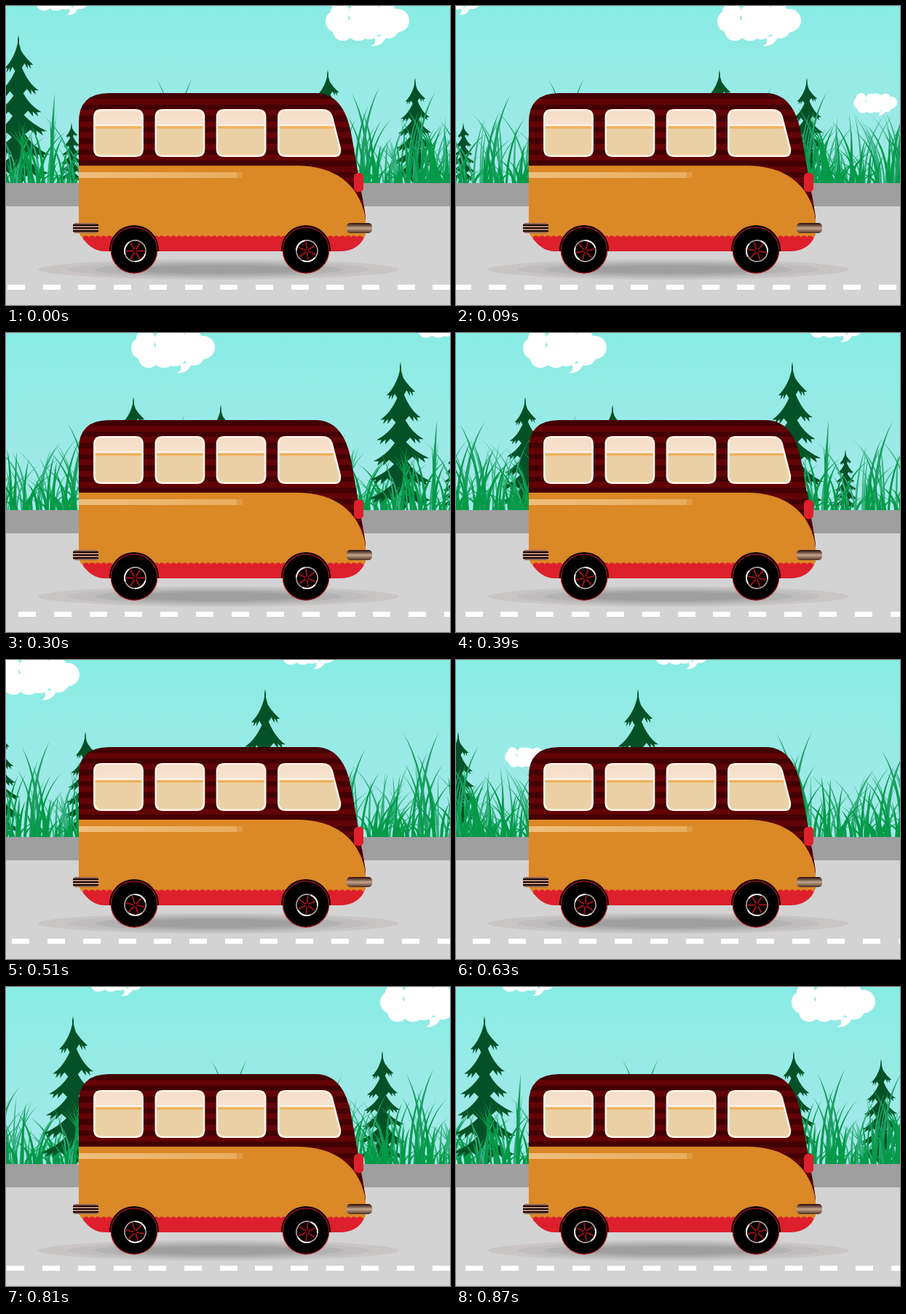
Write an HTML page with a canvas that moves like this. It is 610x412 px and loops after 0.9 s.

```html
<!DOCTYPE html>
<html lang="en">
<head>
<meta charset="utf-8">
<title>Bus ride</title>
<style>
html, body { margin: 0; width: 100%; height: 100%; overflow: hidden; background: #d3d3d3; }
canvas { display: block; }
</style>
</head>
<body>
<canvas id="stage" width="610" height="412"></canvas>
<script>
const W = 610, H = 412, SPAN = 792, GROUND = 244;
const STEP = 30, STEPS = 30, DASH_GAP = 48.7;
const ctx = document.getElementById('stage').getContext('2d');

// Distance travelled by step number.
const SCENE = [[0, 0], [15, 400], [29, 770], [30, 792]];
const DASHES = [[0, 0], [6, 108], [13, 233], [17, 334.5], [21, 417], [25, 499.5], [29, 573], [30, 585]];

function along(table, k) {
  const i = table.findIndex(p => p[0] > k);
  const [k0, v0] = table[i - 1], [k1, v1] = table[i];
  return v0 + (v1 - v0) * (k - k0) / (k1 - k0);
}

function randomizer(seed) {
  return () => (seed = (seed * 16807) % 2147483647) / 2147483647;
}

function layer(w, paint) {
  const c = document.createElement('canvas');
  c.width = w;
  c.height = H;
  paint(c.getContext('2d'));
  return c;
}

function gradient(g, x0, y0, x1, y1, ...colors) {
  const grad = g.createLinearGradient(x0, y0, x1, y1);
  colors.forEach((c, i) => grad.addColorStop(i / (colors.length - 1), c));
  return grad;
}

function shape(g, d, fill, stroke, width) {
  const p = new Path2D(d);
  if (fill) { g.fillStyle = fill; g.fill(p); }
  if (stroke) { g.strokeStyle = stroke; g.lineWidth = width; g.stroke(p); }
}

function disc(g, x, y, rx, ry, fill, stroke, width) {
  g.beginPath();
  g.ellipse(x, y, rx, ry, 0, 0, Math.PI * 2);
  if (fill) { g.fillStyle = fill; g.fill(); }
  if (stroke) { g.strokeStyle = stroke; g.lineWidth = width; g.stroke(); }
}

function pill(g, x, y, w, h, r, fill) {
  g.beginPath();
  g.roundRect(x, y, w, h, r);
  g.fillStyle = fill;
  g.fill();
}

const PUFFS = [[16, 21, 16], [20, 8, 13], [24, 34, 14], [45, 31, 17], [60, 30, 16], [58, 20, 24],
  [46, 10, 14], [86, 30, 15], [99, 20, 16], [84, 9, 13]];

function cloud(g, x, bottom, s) {
  g.save();
  g.translate(x, bottom - 56 * s);
  g.scale(s, s);
  for (const [cx, cy, r] of PUFFS) disc(g, cx, cy, r, r, '#fff');
  shape(g, 'M67 43 Q71 52 62 55 Q79 57 84 40 Z', '#fff');
  g.restore();
}

const TIERS = [[43, 20], [78, 27], [105, 33], [135, 38], [165, 41], [190, 42]];

function tree(g, x, top) {
  const s = (GROUND - top) / 204, rnd = randomizer(91);
  g.save();
  g.translate(x, top);
  g.scale(s, s);
  g.fillStyle = '#045127';
  for (const side of [-1, 1]) {
    g.beginPath();
    g.moveTo(-side, 0);
    g.quadraticCurveTo(side, 14, side * 4, 22);
    for (const [ty, tw] of TIERS) {
      const w = tw * (0.95 + rnd() * 0.1), y = ty + rnd() * 6 - 3;
      g.quadraticCurveTo(side * w * 0.5, y - 9, side * w, y);
      g.lineTo(side * w * 0.8, y);
      g.lineTo(side * w * 0.86, y + 6);
      g.lineTo(side * w * 0.62, y - 1);
      g.lineTo(side * w * 0.64, y + 6);
      g.lineTo(side * w * 0.42, y - 2);
      g.lineTo(side * w * 0.24, y + 4);
    }
    g.lineTo(side * 5, 204);
    g.lineTo(-side, 204);
    g.fill();
  }
  g.restore();
}

function blade(g, x, h, lean, w, color) {
  const tx = x + lean, ty = GROUND - h, my = GROUND - h * 0.66, mx = x + lean * 0.1;
  g.beginPath();
  g.moveTo(x - w, GROUND);
  g.quadraticCurveTo(mx - w, my, tx, ty);
  g.quadraticCurveTo(mx + w, my, x + w, GROUND);
  g.fillStyle = color;
  g.fill();
}

// Tip position, height and lean of the tallest blades.
const TALL = [[67, 124, 4], [155, 122, 26], [207, 143, -32], [256, 145, 28], [352, 119, -28],
  [387, 122, 30], [475, 124, -24], [513, 132, 26], [550, 104, -30], [590, 126, 28],
  [705, 112, 20], [735, 106, 32]];

function grass(g) {
  const rnd = randomizer(4217);
  for (let i = 0; i < 190; i++) {
    blade(g, rnd() * SPAN, 35 + rnd() * 65, (rnd() - 0.5) * 90, 0.9 + rnd() * 0.7, '#2fae78');
  }
  for (const [x, h, lean] of TALL) {
    blade(g, x - lean, h, lean, 2.2, '#1d9f62');
    blade(g, x - lean * 1.3, h * 0.8, lean * 0.7, 1.8, '#0f9a54');
    blade(g, x - lean * 0.8, h * 0.7, -lean * 0.9, 1.6, '#0f9a54');
  }
  for (let i = 0; i < 290; i++) {
    const r = rnd();
    blade(g, rnd() * SPAN, 16 + r * r * 74, (rnd() - 0.5) * 76, 1.2 + rnd() * 0.9, '#049a48');
  }
}

const scenery = layer(SPAN, g => {
  for (const shift of [-SPAN, 0, SPAN]) {
    g.save();
    g.translate(shift, 0);
    cloud(g, 439, 56, 1);
    cloud(g, 626, 152, 0.525);
    cloud(g, 33, 13, 0.8);
    tree(g, 17, 40);
    tree(g, 442, 88);
    tree(g, 562, 99);
    tree(g, 90, 161);
    grass(g);
    g.restore();
  }
});

const backdrop = layer(W, g => {
  g.fillStyle = gradient(g, 0, 0, 0, GROUND, '#88ece4', '#98eae6', '#a5e8ec');
  g.fillRect(0, 0, W, GROUND);
});

function windowPane(g, d) {
  const p = new Path2D(d);
  g.save();
  g.clip(p);
  g.fillStyle = '#ebd0a6';
  g.fillRect(115, 140, 350, 70);
  g.fillStyle = gradient(g, 0, 142, 0, 164, '#f5dcc6', '#f7e2d0');
  g.fillRect(115, 140, 350, 24);
  g.fillStyle = '#fdf3e6';
  g.fillRect(115, 163, 350, 2);
  g.fillStyle = '#f0b25c';
  g.fillRect(115, 166, 350, 3);
  g.restore();
  shape(g, d, null, '#fff4ea', 2.6);
}

function wheelBase(g, x) {
  shape(g, `M${x - 34} 338 V336 A34 34 0 0 1 ${x + 34} 336 V338 Z`, '#000');
  disc(g, x, 336.5, 31.7, 31.7, '#000', '#b3141e', 1.2);
}

const bus = layer(W, g => {
  const rings = [[248, 14, '#cac5c5'], [207, 12, '#bfbdbd'], [170, 10, '#b4b3b3'],
    [140, 8, '#a9a9a9'], [118, 6, '#9f9f9f']];
  for (const [rx, ry, c] of rings) disc(g, 292, 363, rx, ry, c);

  g.save();
  g.clip(new Path2D('M100 160 Q100 120 142 120 H425 C458 120 470 150 475 180 L484 232 C487 252 491 268 494 290 V300 H100 Z'));
  for (let i = 0; i < 24; i++) {
    g.fillStyle = i % 2 ? '#610307' : '#430003';
    g.fillRect(100, Math.round(120 + i * 7.75), 400, 8);
  }
  g.restore();

  shape(g, 'M102 314 H494 Q486 338 458 338 H136 Q115 338 102 314 Z', '#de1f2c');
  shape(g, 'M100 220 H400 C452 220 484 246 493 288 L495 304 Q495 313 492 319 H104 L100 312 Z', '#db8826');
  for (let x = 110; x < 490; x += 8) disc(g, x, 320, 4, 3.4, '#de1f2c');

  g.fillStyle = gradient(g, 100, 0, 317, 0, '#efbd7c', '#ecb66e', '#e8ad5f');
  g.fillRect(100, 229, 217, 8);
  g.fillStyle = '#e19a42';
  g.fillRect(317, 229, 8, 8);

  for (const x of [121.4, 205.8, 290]) {
    windowPane(g, `M${x + 10} 143.3 h46.2 q10 0 10 10 v43.4 q0 10 -10 10 h-46.2 q-10 0 -10 -10 v-43.4 q0 -10 10 -10 Z`);
  }
  windowPane(g, 'M384.4 143.3 H434 Q445 143.3 447.6 152 L458.8 196 Q460 206.7 452 206.7 H384.4 Q374.4 206.7 374.4 196.7 V153.3 Q374.4 143.3 384.4 143.3 Z');

  pill(g, 478, 230, 13, 26, 5, '#de1f2c');
  wheelBase(g, 176);
  wheelBase(g, 412);

  pill(g, 92, 299, 35, 14, 4, gradient(g, 0, 299, 0, 313, '#8a5f52', '#c99a86', '#8a5f52'));
  g.fillStyle = '#160504';
  for (const y of [301, 305, 309]) g.fillRect(92, y, 35, 2);
  pill(g, 468, 299, 35, 14, 5, gradient(g, 0, 299, 0, 313, '#2a0d0a', '#6f5244', '#c5a78d', '#8e6d59', '#4a2c22'));
});

function hub(x, angle) {
  ctx.save();
  ctx.translate(x, 337.5);
  ctx.rotate(angle);
  disc(ctx, 0, 0, 14.6, 14.6, '#080000', '#b5aaa6', 1.6);
  ctx.strokeStyle = '#f4f1ee';
  ctx.lineWidth = 2;
  for (const a of [0.3, 2.8]) {
    ctx.beginPath();
    ctx.arc(0, 0, 14.6, a, a + 1.3);
    ctx.stroke();
  }
  ctx.strokeStyle = '#a5121b';
  ctx.lineWidth = 1.8;
  ctx.beginPath();
  for (let i = 0; i < 6; i++) {
    const a = i * Math.PI / 3;
    ctx.moveTo(Math.cos(a) * 2, Math.sin(a) * 2);
    ctx.lineTo(Math.cos(a) * 13, Math.sin(a) * 13);
  }
  ctx.stroke();
  ctx.restore();
}

function draw(k) {
  ctx.drawImage(backdrop, 0, 0);
  const x = -Math.round(along(SCENE, k));
  ctx.drawImage(scenery, x, 0);
  ctx.drawImage(scenery, x + SPAN, 0);

  ctx.fillStyle = '#9f9f9f';
  ctx.fillRect(0, GROUND, W, 32);
  ctx.fillStyle = '#d3d3d3';
  ctx.fillRect(0, 276, W, H - 276);

  ctx.fillStyle = '#fff';
  const first = 2 - along(DASHES, k) % DASH_GAP;
  for (let dx = first; dx < W; dx += DASH_GAP) ctx.fillRect(Math.round(dx), 384, 24, 7);

  ctx.drawImage(bus, 0, 0);
  const angle = k / STEPS * Math.PI * 6;
  hub(177.5, angle);
  hub(413.5, angle + 0.4);
}

const start = performance.now();
function tick() {
  const t = Math.max(0, performance.now() - start);
  draw(Math.floor(t / STEP) % STEPS);
  requestAnimationFrame(tick);
}
tick();
</script>
</body>
</html>
```
